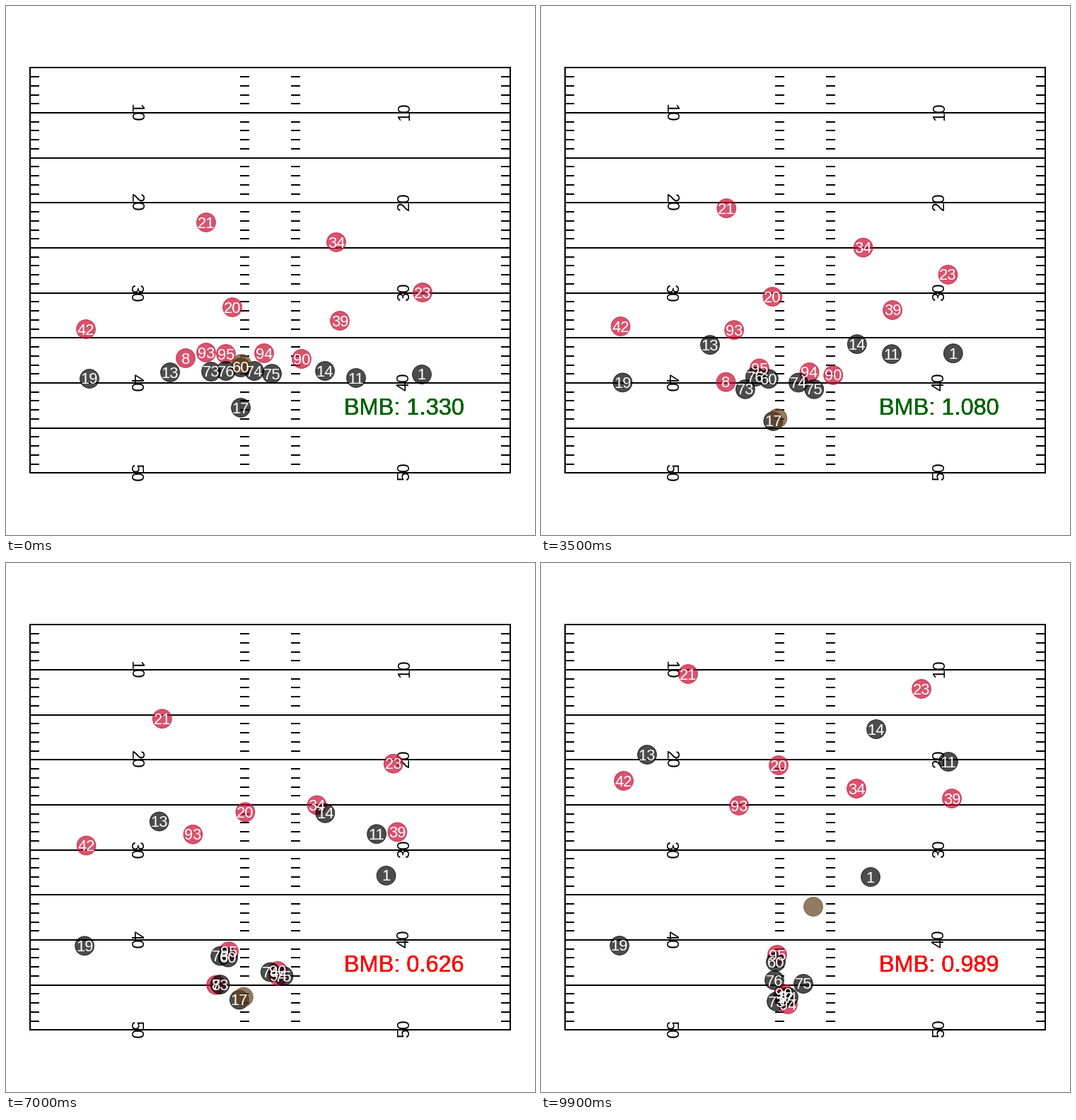
Recreate the animation shown at these times as a matplotlib script. Size 748 by 748 pixels, loop 10000 ms.

```python
import numpy as np
import matplotlib.pyplot as plt
from matplotlib.animation import FuncAnimation
from matplotlib.colors import to_rgb, to_rgba
from matplotlib.patches import Circle

SIZE, DPI, FRAMES = 748, 64, 100
PT = 72 / DPI                      # points per pixel
LAST = FRAMES - 1
TICK = LAST / 40                   # frames per tracking sample
SNAP, RAMP, CATCH, THROW = 12, 22, 27, 88
RED, BLACK, BROWN = "#c60c30", "black", "#654321"
LEFT, RIGHT, TOP, YARD = 34, 713, 87.35, 12.733

# Each route bends from a start towards a pull point and on to a finish
COVERAGE = {
    21: [(283, 306), (212, 245), (208, 157)],
    34: [(467, 334), (426, 364), (446, 319)],
    23: [(589, 405), (543, 332), (538, 178)],
    20: [(320, 426), (346, 383), (336, 286)],
    39: [(472, 445), (556, 399), (581, 333)],
    42: [(113, 457), (111, 456), (117, 308)],
    93: [(283, 490), (246, 384), (280, 343)],
}
RUSH = {
    8: [(254, 498), (274, 614), (342, 613)],
    95: [(311, 492), (301, 563), (334, 554)],
    94: [(365, 491), (421, 580), (349, 624)],
    90: [(418, 499), (407, 575), (343, 609)],
}
PROTECTION = {
    73: [(290, 517), (282, 601), (333, 620)],
    76: [(311, 516), (279, 540), (330, 590)],
    60: [(332, 511), (294, 567), (332, 564)],
    74: [(351, 516), (400, 569), (350, 614)],
    75: [(376, 520), (415, 595), (371, 595)],
    17: [(332, 568), (317, 635), (345, 615)],
}
RECEIVERS = {
    19: [(118, 527), (109, 546), (111, 541)],
    13: [(232, 518), (266, 395), (150, 271)],
    14: [(451, 516), (433, 400), (474, 235)],
    11: [(495, 526), (491, 422), (576, 281)],
    1: [(588, 521), (580, 416), (466, 444)],
}
BALL_START, BALL_END, HANDS = (333, 506), (385, 486), (6, -4)

# Score by tracking sample
SCORE_K = [0, 11, 17, 22, 28, 33, 40]
SCORE_V = [1.33, 1.11, 1.05, 0.722, 0.626, 0.808, 0.989]


def progress(frame):
    """Still until the snap, then speed up and hold that speed."""
    def run(d):
        return d * d / (2 * RAMP) if d < RAMP else d - RAMP / 2
    return run(max(frame - SNAP, 0)) / run(LAST - SNAP)


def along(route, frame):
    start, pull, finish = np.array(route, float)
    s = progress(frame)
    return (1 - s) ** 2 * start + 2 * s * (1 - s) * pull + s * s * finish


def ball_at(frame):
    """Snapped to the passer, carried, then thrown."""
    hands = along(PROTECTION[17], frame) + HANDS
    snapped = np.clip((frame - SNAP) / (CATCH - SNAP), 0, 1)
    thrown = np.clip((frame - THROW) / (LAST - THROW), 0, 1)
    held = np.array(BALL_START) * (1 - snapped) + hands * snapped
    return held * (1 - thrown) + np.array(BALL_END) * thrown


# Colour blending in CIE Lab
XYZ = np.array([[0.4124, 0.3576, 0.1805], [0.2126, 0.7152, 0.0722], [0.0193, 0.1192, 0.9505]])
WHITE = XYZ.sum(axis=1)
LAB = np.array([[0, 116, 0], [500, -500, 0], [0, 200, -200]])


def to_lab(color):
    c = np.array(to_rgb(color))
    lin = np.where(c > 0.04045, ((c + 0.055) / 1.055) ** 2.4, c / 12.92)
    q = XYZ @ lin / WHITE
    return LAB @ np.where(q > 0.008856, np.cbrt(q), 7.787 * q + 16 / 116)


def from_lab(lab):
    f = np.linalg.solve(LAB, lab)
    q = np.where(f > 0.2069, f ** 3, (f - 16 / 116) / 7.787)
    lin = np.clip(np.linalg.solve(XYZ, q * WHITE), 0, 1)
    return np.clip(np.where(lin > 0.0031308, 1.055 * lin ** (1 / 2.4) - 0.055, 12.92 * lin), 0, 1)


def score(k):
    return np.interp(k, SCORE_K, SCORE_V)


def score_color(frame):
    k, part = divmod(frame / TICK, 1)
    a, b = ("darkgreen" if score(j) >= 1 else "red" for j in (k, k + 1))
    if a == b:
        return to_rgb(a)
    return tuple(from_lab(to_lab(a) * (1 - part) + to_lab(b) * part))


plt.rcParams["font.family"] = "Liberation Sans"
fig = plt.figure(figsize=(SIZE / DPI, SIZE / DPI), dpi=DPI, facecolor="white")
ax = fig.add_axes([0, 0, 1, 1])
ax.set(xlim=(0, SIZE), ylim=(SIZE, 0))
ax.axis("off")


def label(x, y, s, px, color, rot=0, z=2):
    """Text centred along its baseline at (x, y)."""
    return ax.text(x, y, s, fontsize=px * PT, color=color, rotation=rot, ha="center",
                   va="baseline", rotation_mode="anchor", zorder=z)


def disc(color, z):
    tint = to_rgba(color, 0.7)
    return ax.add_patch(Circle((0, 0), 13.4, fc=tint, ec=tint, lw=PT, zorder=z))


def draw_field():
    pen = dict(colors="black", lw=2 * PT, zorder=1)
    for yd in range(5, 51):
        y = round(TOP + (yd - 5) * YARD)
        if yd % 5 == 0:
            ax.hlines(y, LEFT - 1, RIGHT + 1, **pen)
        else:
            for x in (LEFT, 331, 403, RIGHT - 13):
                ax.hlines(y, x, x + 13, **pen)
        if yd % 10 == 0:
            label(176.5, y, str(yd), 23, "black", 270)
            label(570, y - 2, str(yd), 23, "black", 90)
    ax.vlines([LEFT, RIGHT], round(TOP), round(TOP + 45 * YARD), **pen)


draw_field()

players = []
for team, color, z in ((COVERAGE | RUSH, RED, 3), (PROTECTION | RECEIVERS, BLACK, 4)):
    for number, route in team.items():
        players.append((route, disc(color, z), label(0, 0, str(number), 22, "white", z=6)))
ball = disc(BROWN, 5)

# Stacked copies give the heavy text edges
readout = [label(562.5, 578.5, "", 32.5, "darkgreen", z=7) for _ in range(5)]


def update(frame):
    for route, dot, num in players:
        x, y = along(route, frame)
        dot.center = x, y
        num.set_position((x, y + 7.5))
    ball.center = tuple(ball_at(frame))
    value = float(f"{score(round(frame / TICK)):.3g}")
    color = score_color(frame)
    for txt in readout:
        txt.set_text(f"BMB: {value:.3f}")
        txt.set_color(color)
    return []


anim = FuncAnimation(fig, update, frames=FRAMES, interval=100, repeat=True, repeat_delay=0)
plt.show()
```
